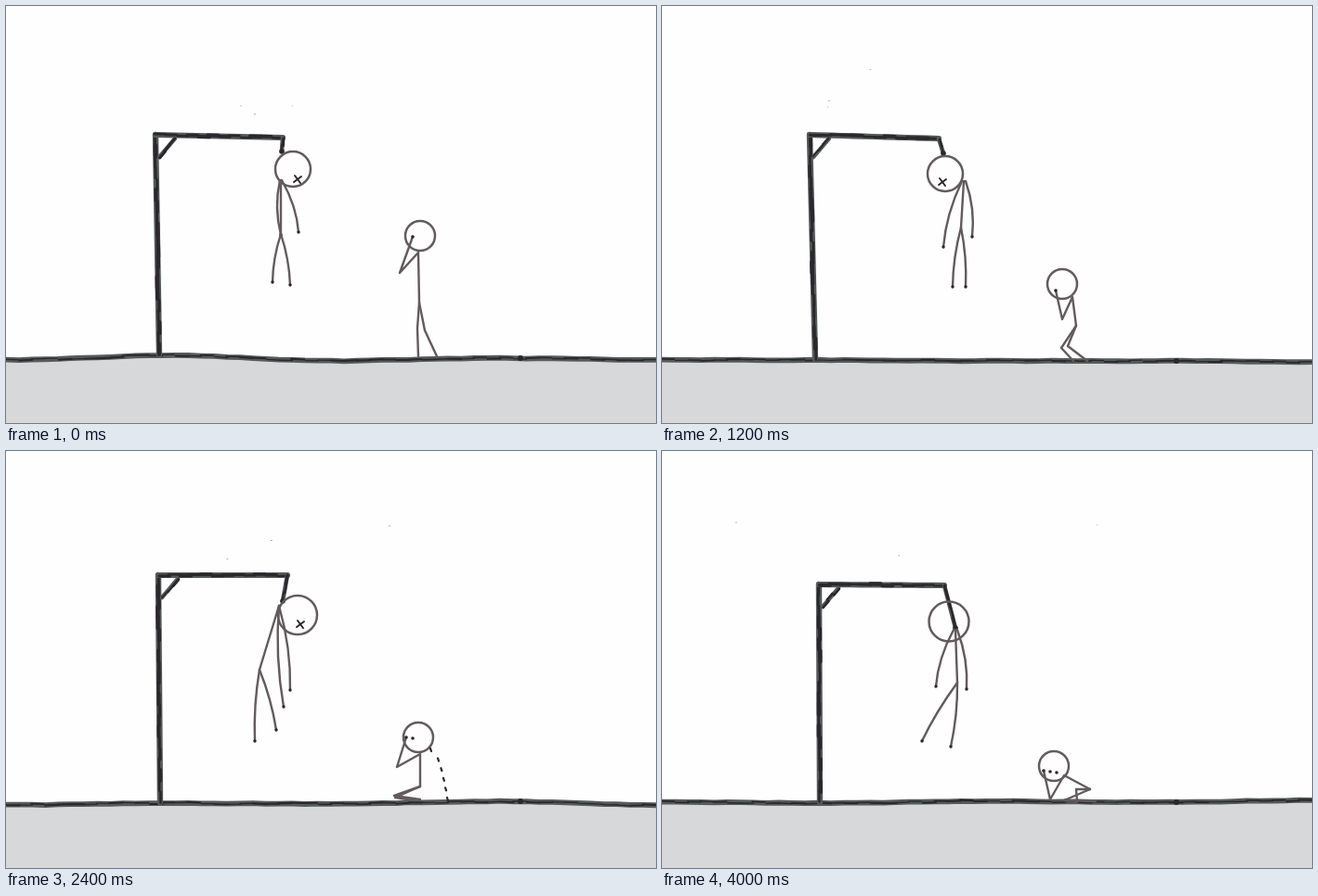
Write an HTML page with a canvas that moves like this. It is 700 px wide and 450 px high and loops after 4400 ms.

```html
<!DOCTYPE html>
<html lang="en">
<head>
<meta charset="utf-8">
<style>
html, body { margin: 0; width: 100%; height: 100%; overflow: hidden; background: #fefefe; }
canvas { display: block; width: 700px; height: 450px; }
</style>
</head>
<body>
<canvas id="stage" width="700" height="450"></canvas>
<script>
const ctx = document.getElementById('stage').getContext('2d');
const STEP = 400;
const PAPER = '#fefefe', SOIL = '#d7d8da', INK = '#625b5d', DARK = '#2b272c', EDGE = '#545b59';

let seed = 1;
const rnd = () => (seed = (seed * 16807) % 2147483647) / 2147483647;
const jit = r => (rnd() - 0.5) * r;

// Halfway between two numbers, lists or poses.
function mix(a, b) {
  if (typeof a === 'number') return (a + b) / 2;
  if (Array.isArray(a)) return a.map((v, i) => mix(v, b[i] ?? v));
  return Object.fromEntries(Object.keys(a).map(k => [k, mix(a[k], b[k] ?? a[k])]));
}

// Key poses of the hanging figure; ground holds five evenly spaced heights.
const calm = {
  ground: [382, 377, 383, 380, 382], top: [161, 139], foot: 165, hook: [298, 142], knot: [297, 157],
  head: [309, 176], r: 19, neck: [296, 188], hip: [296, 246], spread: 1,
  hands: [[296, 247], [315, 244]], feet: [[287, 298], [306, 301]], eyes: [[314, 187]]
};
const lifted = {
  ground: [369, 371, 372, 370, 375], top: [162, 129], foot: 165, hook: [299, 130], knot: [300, 146],
  head: [307, 168], r: 19, neck: [290, 180], hip: [290, 218], spread: 3,
  hands: [[278, 230], [305, 236]], feet: [[276, 288], [294, 287]], eyes: [[301, 179], [314, 179]]
};
const right = {
  ground: [382, 382, 383, 383, 384], top: [159, 139], foot: 165, hook: [298, 143], knot: [303, 159],
  head: [305, 181], r: 19, neck: [325, 189], hip: [322, 239], spread: 2,
  hands: [[303, 260], [334, 249]], feet: [[313, 303], [327, 303]], eyes: [[302, 190]]
};
const turned = {
  ground: [377, 378, 384, 381, 380], top: [162, 139], foot: 165, hook: [297, 139], knot: [291, 190],
  head: [301, 181], r: 20.5, neck: [291, 194], hip: [282, 247], spread: 2,
  hands: [[266, 250], [303, 269]], feet: [[258, 325], [289, 325]], eyes: []
};
const left = {
  ground: [382, 380, 381, 378, 382], top: [164, 134], foot: 166, hook: [303, 134], knot: [298, 162],
  head: [314, 177], r: 21, neck: [294, 167], hip: [273, 236], spread: 0,
  hands: [[299, 276], [306, 258]], feet: [[268, 313], [291, 301]], eyes: [[317, 187]]
};
const facing = {
  ground: [380, 380, 378, 376, 375], top: [163, 141], foot: 166, hook: [301, 142], knot: [301, 164],
  head: [305, 184], r: 22, neck: [302, 206], hip: [304, 250], spread: 10,
  hands: [[287, 276], [319, 264]], feet: [[299, 322], [314, 322]], eyes: [[296, 195], [317, 194]]
};
const away = {
  ground: [379, 380, 378, 379, 377], top: [169, 144], foot: 170, hook: [304, 145], knot: [316, 191],
  head: [309, 184], r: 21.5, neck: [316, 193], hip: [318, 250], spread: 2,
  hands: [[295, 254], [328, 257]], feet: [[280, 313], [311, 319]], eyes: []
};

// Key poses of the mourner.
const standing = {
  head: [446, 248], hand: [438, 249], elbow: [424, 288], neck: [444, 266], hip: [445, 320],
  knees: [[443, 348], [451, 350]], feet: [[444, 378], [464, 378]], dots: 1
};
const swaying = {
  head: [452, 246], hand: [438, 241], elbow: [427, 279], neck: [446, 264], hip: [445, 314],
  knees: [[431, 341], [443, 343]], feet: [[442, 368], [459, 369]], dots: 2
};
const crouched = {
  head: [431, 300], hand: [424, 307], elbow: [431, 338], neck: [442, 314], hip: [446, 345],
  knees: [[430, 369], [437, 367]], feet: [[443, 383], [458, 383]], dots: 1
};
const kneeling = {
  head: [444, 309], hand: [431, 309], elbow: [421, 341], neck: [446, 327], hip: [446, 362],
  knees: [[418, 372], [419, 374]], feet: [[446, 376], [440, 377]], dots: 2
};
const lying = {
  head: [422, 338], hand: [411, 343], elbow: [418, 374], neck: [433, 348], hip: [461, 363],
  knees: [[433, 375], [446, 363]], feet: [[467, 376], [447, 376]], dots: 3
};

const scenes = [
  { body: calm, mourner: standing },
  { body: lifted, mourner: swaying },
  { body: mix(lifted, right), mourner: mix(swaying, crouched) },
  { body: right, mourner: crouched },
  { body: mix(right, turned), mourner: kneeling },
  { body: turned, mourner: lying, shift: [5, 4] },
  { body: left, mourner: kneeling, tears: true },
  { body: mix(left, facing), mourner: kneeling, tears: true },
  { body: facing, mourner: lying, scan: true },
  { body: mix(facing, away), mourner: lying },
  { body: away, mourner: lying, shift: [0, 2] }
];

function line(pts, color, width) {
  ctx.strokeStyle = color;
  ctx.lineWidth = width;
  ctx.beginPath();
  pts.forEach(([x, y]) => ctx.lineTo(x, y));
  ctx.stroke();
}

function dot([x, y], r) {
  ctx.fillStyle = DARK;
  ctx.beginPath();
  ctx.arc(x, y, r, 0, 7);
  ctx.fill();
}

const pen = (...pts) => line(pts, INK, 2.4);

function ring([x, y], r) {
  ctx.strokeStyle = INK;
  ctx.lineWidth = 2.5;
  ctx.beginPath();
  ctx.arc(x, y, r, 0, 7);
  ctx.stroke();
}

// Felt-tip line: soft edge with an uneven dark core.
function felt(pts, width, core) {
  line(pts, EDGE, width);
  for (let i = 1; i < pts.length; i++) {
    const o = jit(2);
    line([pts[i - 1], pts[i]].map(([x, y]) => [x + o, y + o]), DARK, width * core * (0.6 + rnd() * 0.6));
  }
}

function bar([x1, y1], [x2, y2], width) {
  const n = Math.ceil(Math.hypot(x2 - x1, y2 - y1) / 12);
  const pts = Array.from({ length: n + 1 }, (_, i) => [x1 + (x2 - x1) * i / n, y1 + (y2 - y1) * i / n]);
  felt(pts, width, 0.6);
}

// Limb bowed outwards, ending in a dark tip.
function limb([x1, y1], [x2, y2], bow) {
  ctx.strokeStyle = INK;
  ctx.lineWidth = 2.4;
  ctx.beginPath();
  ctx.moveTo(x1, y1);
  ctx.quadraticCurveTo((x1 + x2) / 2 + bow, (y1 + y2) / 2, x2, y2);
  ctx.stroke();
  dot([x2, y2], 1.7);
}

function cross([x, y]) {
  line([[x - 3, y - 4], [x + 3, y + 4]], DARK, 2);
  line([[x + 4, y - 3], [x - 4, y + 3]], DARK, 2);
}

function drawGround(heights) {
  const pts = [];
  for (let x = 0; x <= 700; x += 14) {
    const i = Math.min(3, Math.floor(x / 175)), t = x / 175 - i;
    const ease = t * t * (3 - 2 * t);
    pts.push([x, heights[i] + (heights[i + 1] - heights[i]) * ease + jit(0.8)]);
  }
  ctx.fillStyle = SOIL;
  ctx.beginPath();
  pts.forEach(p => ctx.lineTo(...p));
  ctx.lineTo(700, 450);
  ctx.lineTo(0, 450);
  ctx.fill();
  felt(pts, 5.8, 0.32);
  dot([554, heights[3]], 3);
}

function drawGallows({ top, foot, hook, knot, ground }) {
  const [x, y] = top;
  bar(top, [foot, ground[1] - 1], 6.4);
  bar(top, hook, 6.2);
  bar([x + 21, y + 4], [x + 4, y + 24], 4.5);
  bar(hook, knot, 4.6);
  dot(knot, 2.8);
}

function drawBody({ head, r, neck, hip, spread, hands, feet, eyes }) {
  ring(head, r);
  pen(neck, hip);
  [-1, 1].forEach((side, i) => {
    limb([neck[0] + side * spread, neck[1]], hands[i], side * 7);
    limb(hip, feet[i], side * 4);
  });
  eyes.forEach(cross);
}

function drawMourner({ head, hand, elbow, neck, hip, knees, feet, dots }, tears) {
  ring(head, 16);
  pen(hand, elbow, neck, hip);
  knees.forEach((knee, i) => pen(hip, knee, feet[i]));
  for (let i = 0; i < dots; i++) dot([hand[0] + i * 7, hand[1] + i], 1.8);
  if (!tears) return;
  for (let t = 0; t <= 1; t += 0.2) {
    const x = head[0] + 13 + 18 * Math.sqrt(t), y = head[1] + 12 + 53 * t;
    line([[x, y], [x + 1, y + 3]], DARK, 2.2);
  }
}

// Faint edge of the scanned sheet.
function drawScan() {
  ctx.setLineDash([9, 3]);
  line([[66, 67], [130, 71], [350, 72]], '#d0cfcf', 1);
  line([[67, 112], [71, 180], [67, 280]], '#d0cfcf', 1);
  ctx.setLineDash([]);
}

function drawDust() {
  for (let i = 0; i < 3; i++) {
    const x = 60 + rnd() * 580, y = 62 + rnd() * 60;
    line([[x, y], [x + rnd() * 2, y]], '#a5a3a6', 0.8);
  }
}

function draw(i) {
  const { body, mourner, shift = [0, 0], tears, scan } = scenes[i];
  seed = 97 + i * 131;
  ctx.fillStyle = PAPER;
  ctx.fillRect(0, 0, 700, 450);
  ctx.lineCap = ctx.lineJoin = 'round';
  drawGround(body.ground);
  drawGallows(body);
  drawBody(body);
  ctx.save();
  ctx.translate(...shift);
  drawMourner(mourner, tears);
  ctx.restore();
  if (scan) drawScan();
  drawDust();
}

let shown = -1;
function tick(now) {
  const i = Math.floor(now / STEP) % scenes.length;
  if (i !== shown) draw(shown = i);
  requestAnimationFrame(tick);
}
draw(shown = 0);
requestAnimationFrame(tick);
</script>
</body>
</html>
```
